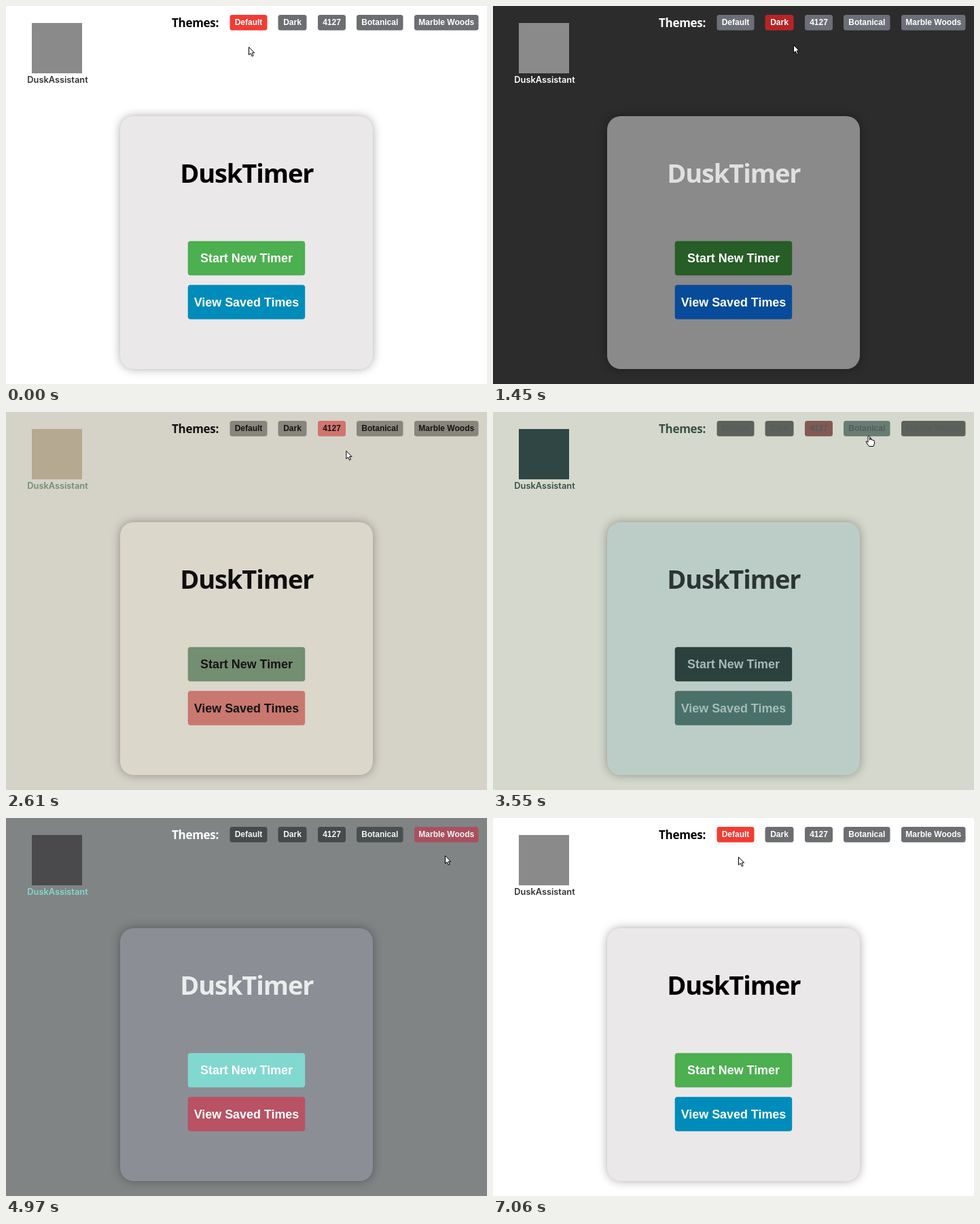
Animation, 708 px wide and 556 px high, one loop 7090 ms. Source, as an HTML page:

```html
<!DOCTYPE html>
<html lang="en">
<head>
<meta charset="utf-8">
<title>Timer themes</title>
<style>
  html, body { margin: 0; width: 100%; height: 100%; overflow: hidden; }
  svg { display: block; width: 708px; height: 556px; }
  text { font-family: "Liberation Sans", Arial, sans-serif; font-weight: 700; text-anchor: middle; }
  .humanist { font-family: "Open Sans", "Noto Sans", sans-serif; }
  .brand { font-family: Inter, sans-serif; font-size: 12.8px; font-weight: 600; }
  #card { filter: drop-shadow(0 0 7px rgba(0, 0, 0, .33)); }
</style>
</head>
<body>
<svg id="stage" viewBox="0 0 708 556">
  <rect id="page" width="708" height="556"/>
  <rect id="logo" x="38" y="25" width="74" height="74"/>
  <text id="brand" class="brand" x="76" y="113">DuskAssistant</text>
  <text id="label" class="humanist" x="278.5" y="31" font-size="17" letter-spacing="-.3">Themes:</text>
  <g id="tabs"></g>
  <rect id="card" x="168" y="162" width="372" height="372" rx="20"/>
  <text id="title" class="humanist" x="354.3" y="260" font-size="38" letter-spacing="-1.1">DuskTimer</text>
  <rect id="start" x="267.7" y="345.7" width="172.5" height="50.5" rx="4"/>
  <text id="startText" x="354" y="377" font-size="17.9">Start New Timer</text>
  <rect id="saved" x="267.7" y="410.3" width="172.5" height="50.5" rx="4"/>
  <text id="savedText" x="354" y="441.5" font-size="17.9">View Saved Times</text>
  <g id="cursor" stroke="#000" fill="#fff" stroke-linejoin="round">
    <path id="arrow" d="M.5.5V12l2.7-2.4 2 4.4 1.9-.9-2-4.2h3.6z"/>
    <path id="hand" d="M-1 1Q.4-.8 1.7 1V6.2Q3-.1 4 6Q5.5 5 6.2 6.8Q8.5 6 8.5 8.5V11L7 15.5H.5L-3.3 10Q-4.6 7.6-2.6 8L-1 9.6z"/>
  </g>
</svg>
<script>
const LOOP = 7090, FADE = 400;
const $ = id => document.getElementById(id);

// Colours under "fade" ease to the next theme; all others switch at once.
const themes = [
  { label: '#000', brand: '#333', logo: '#8a8a8a', card: '#ebe8e9', start: '#4caf50', saved: '#008cba', text: '#fff',
    fade: { page: [255, 255, 255], title: [0, 0, 0], tab: [108, 110, 113], active: [242, 60, 51], tabText: [255, 255, 255] } },
  { label: '#fff', brand: '#fff', logo: '#8a8a8a', card: '#8a8a8a', start: '#275d27', saved: '#084b9a', text: '#fff',
    fade: { page: [44, 44, 44], title: [224, 224, 224], tab: [108, 111, 119], active: [184, 36, 38], tabText: [255, 255, 255] } },
  { label: '#111', brand: '#738e70', logo: '#b5a991', card: '#dbd7cb', start: '#738e70', saved: '#c9786f', text: '#141414',
    fade: { page: [213, 210, 200], title: [14, 14, 14], tab: [136, 134, 124], active: [210, 116, 110], tabText: [20, 20, 20] } },
  { label: '#37504a', brand: '#37504a', logo: '#2f4644', card: '#bccdc7', start: '#2c403e', saved: '#4a7169', text: '#a5bdb6',
    fade: { page: [213, 222, 208], title: [72, 94, 88], tab: [47, 62, 58], active: [74, 113, 105], tabText: [150, 170, 165] } },
  { label: '#fff', brand: '#81d8cf', logo: '#4a4a4c', card: '#8b8e95', start: '#81d8cf', saved: '#b85264', text: '#fff',
    fade: { page: [118, 121, 123], title: [255, 255, 255], tab: [74, 75, 77], active: [184, 82, 100], tabText: [255, 255, 255] } }
];

const clicks = [[670, 1], [2010, 2], [3435, 3], [4730, 4], [6510, 0]];

// Pointer path: time, x, y
const path = [
  [0, 357, 60], [450, 419, 27], [690, 419, 27], [880, 424, 45], [1100, 429, 59], [1450, 442, 57],
  [1800, 473, 30], [2100, 474, 29], [2400, 485, 56], [2900, 525, 58], [3250, 552, 35], [3570, 553, 35],
  [3850, 566, 58], [4250, 622, 56], [4550, 646, 28], [4750, 646, 28], [4970, 646, 55], [5300, 634, 62],
  [5800, 455, 60], [6220, 360, 30], [6530, 360, 30], [6850, 361, 56], [7060, 361, 57], [7090, 357, 60]
];

const tabs = [['Default', 329.5, 55], ['Dark', 400.5, 42], ['4127', 459, 41],
              ['Botanical', 516, 68.5], ['Marble Woods', 601, 94.5]].map(([name, x, w]) => {
  const add = (tag, attrs) => {
    const el = document.createElementNS('http://www.w3.org/2000/svg', tag);
    for (const key in attrs) el.setAttribute(key, attrs[key]);
    return $('tabs').appendChild(el);
  };
  const box = add('rect', { x, y: 13, width: w, height: 22.7, rx: 3.5 });
  const text = add('text', { x: x + w / 2, y: 28, 'font-size': 12 });
  text.textContent = name;
  return { x, w, box, text };
});

const mix = (a, b, p) => a + (b - a) * p;
const rgb = (a, b, p) => `rgb(${a.map((v, i) => Math.round(mix(v, b[i], p)))})`;
const fill = (el, color) => el.setAttribute('fill', color);

// The standard CSS "ease" curve
function ease(x) {
  if (x >= 1) return 1;
  const curve = (a, b, u) => 3 * a * u * (1 - u) ** 2 + 3 * b * u * u * (1 - u) + u ** 3;
  let lo = 0, hi = 1;
  for (let i = 0; i < 20; i++) {
    const mid = (lo + hi) / 2;
    if (curve(.25, .25, mid) < x) lo = mid; else hi = mid;
  }
  return curve(.1, 1, lo);
}

function pointer(t) {
  const i = path.findIndex(point => point[0] > t);
  const [t0, x0, y0] = path[i - 1], [t1, x1, y1] = path[i];
  const u = (t - t0) / (t1 - t0), p = u * u * (3 - 2 * u);
  return [mix(x0, x1, p), mix(y0, y1, p)];
}

function draw(t) {
  const last = clicks.filter(([at]) => at <= t).pop();
  const current = last ? last[1] : 0;
  const previous = last ? (current + 4) % 5 : 0;
  const p = last ? ease((t - last[0]) / FADE) : 1;
  const now = themes[current], from = themes[previous].fade, to = now.fade;

  for (const id of ['label', 'brand', 'logo', 'card', 'start', 'saved']) fill($(id), now[id]);
  for (const id of ['startText', 'savedText']) fill($(id), now.text);
  for (const id of ['page', 'title']) fill($(id), rgb(from[id], to[id], p));

  tabs.forEach(({ box, text }, i) => {
    const before = i === previous ? from.active : from.tab;
    const after = i === current ? to.active : to.tab;
    fill(box, rgb(before, after, p));
    fill(text, rgb(from.tabText, to.tabText, p));
  });

  const [x, y] = pointer(t);
  const over = y >= 13 && y <= 36 && tabs.some(tab => x >= tab.x && x <= tab.x + tab.w);
  $('cursor').setAttribute('transform', `translate(${x.toFixed(1)} ${y.toFixed(1)})`);
  $('hand').style.display = over ? '' : 'none';
  $('arrow').style.display = over ? 'none' : '';
}

const began = performance.now();
function tick() {
  draw((performance.now() - began) % LOOP);
  requestAnimationFrame(tick);
}
tick();
</script>
</body>
</html>
```
